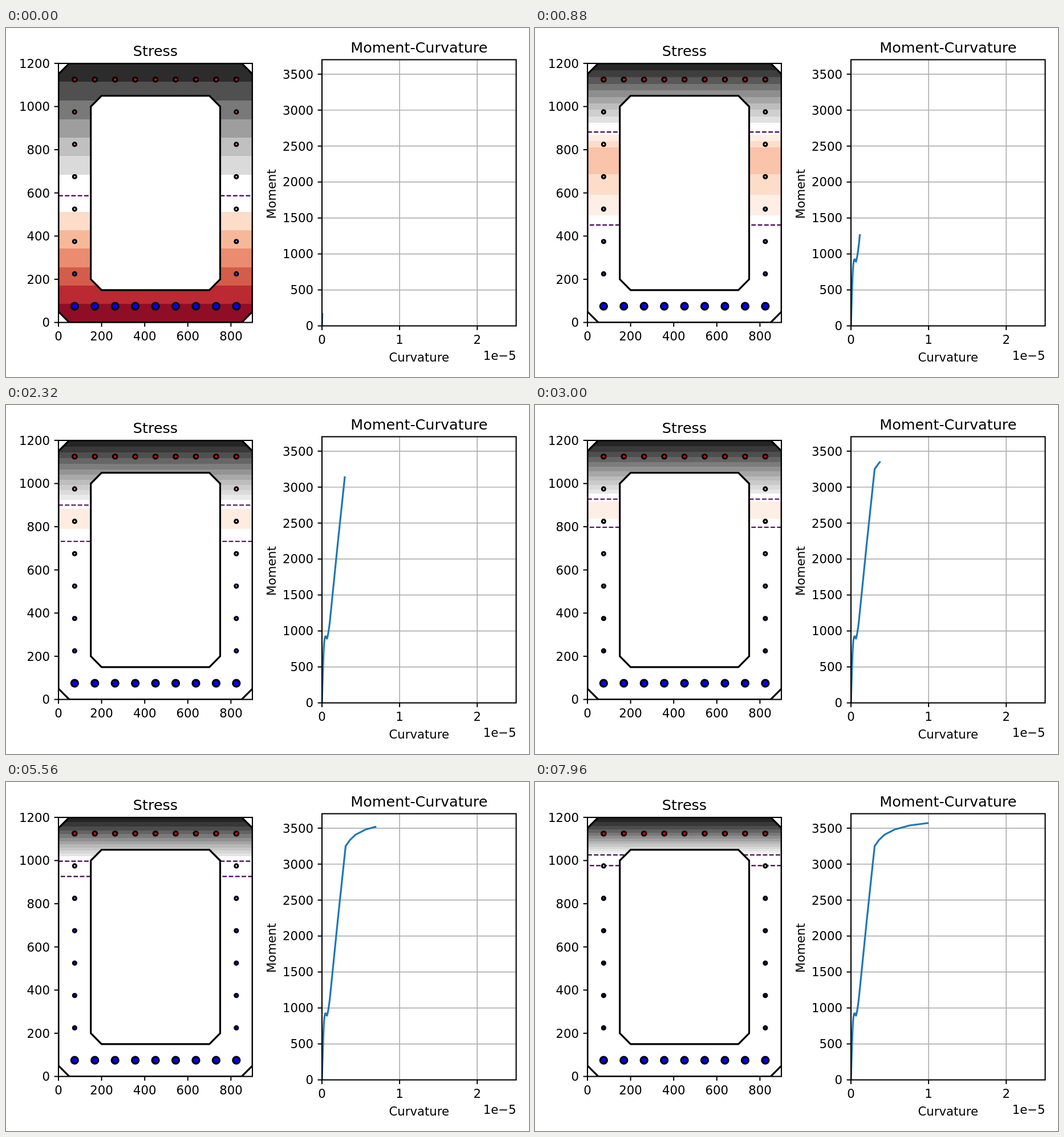
Animation of 917x611 px, one loop 8 s. Source, as an HTML page with a canvas:

```html
<!DOCTYPE html>
<html lang="en">
<head>
<meta charset="utf-8">
<title>Section stress and moment-curvature</title>
<style>
  html, body { margin: 0; width: 100%; height: 100%; overflow: hidden; background: #fff; }
  canvas { display: block; }
</style>
</head>
<body>
<canvas id="stage" width="917" height="611"></canvas>
<script>
const ctx = document.getElementById('stage').getContext('2d');

const STEP_MS = 40, STEPS = 200, CURV_STEP = 5e-8;
const PT = 917 / 432;               // pixels per typographic point
const LINE = 1.5 * PT, THIN = 0.8 * PT;
const FONT = '"DejaVu Sans", sans-serif';

// Left axes: section coordinates in mm
const U = 0.378;
const sx = u => 92 + u * U;
const sy = u => 515.5 - u * U;

// Right axes: curvature in 1e-5, moment
const px = c => 554 + c * 136.1;
const py = m => 521.5 - m * 0.12592;

// Material limits (strain)
const PEAK = 0.0022, SHAPE = 1.6, CRACK = 1.15e-4, OPEN = 4.95e-4, YIELD = 0.0025;

// Neutral axis height by step
const AXIS = [[0, 587], [3, 592], [5, 628], [7, 698], [9, 766], [11, 813], [15, 855], [20, 879],
  [30, 893], [40, 900], [60, 900], [67, 912], [75, 928], [86, 946], [100, 963], [118, 981],
  [139, 997], [165, 1012], [199, 1026]];

// Moment by curvature
const MOMENT = [[0, 0], [.005, 178], [.01, 355], [.015, 530], [.02, 680], [.025, 790], [.03, 858],
  [.035, 895], [.04, 915], [.045, 926], [.05, 924], [.055, 913], [.06, 897], [.065, 893],
  [.07, 912], [.08, 965], [.09, 1035], [.1, 1115], [.205, 2235], [.305, 3250], [.36, 3335],
  [.434, 3410], [.56, 3480], [.757, 3538], [1, 3572]];

const RAMP = ['67001f', 'b2182b', 'd6604d', 'f4a582', 'fddbc7', 'ffffff',
  'e0e0e0', 'bababa', '878787', '4d4d4d', '1a1a1a']
  .map(h => [0, 2, 4].map(i => parseInt(h.slice(i, i + 2), 16)));

const BARS = [];
for (let i = 0; i < 9; i++) {
  const x = 75 + i * 93.75;
  BARS.push([x, 75, 16], [x, 1125, 10]);
}
for (let y = 225; y <= 975; y += 150) BARS.push([75, y, 8], [825, y, 8]);

const rgb = c => `rgb(${c.map(Math.round).join(',')})`;
const mix = (a, b, t) => a.map((v, i) => v + (b[i] - v) * t);

function lerpTable(table, x) {
  let i = 1;
  while (i < table.length - 1 && table[i][0] < x) i++;
  const [x0, y0] = table[i - 1], [x1, y1] = table[i];
  return y0 + (y1 - y0) * (x - x0) / (x1 - x0);
}

// Concrete stress divided by initial stiffness, compression positive
function stress(e) {
  if (e >= 0) return PEAK / SHAPE * (1 - Math.pow(Math.max(0, 1 - e / PEAK), SHAPE));
  if (e > -CRACK) return e;
  return Math.min(0, -CRACK * (OPEN + e) / (OPEN - CRACK));
}

// s runs from -1 (tension) to 1 (compression); near zero reads as white
function rampColor(s) {
  if (s > -0.085 && s < 0.1) return '#fff';
  const p = (s + 1) * 5, i = Math.min(9, Math.floor(p));
  return rgb(mix(RAMP[i], RAMP[i + 1], p - i));
}

function chamfered(x0, y0, x1, y1) {
  const k = 50;
  [[x0 + k, y0], [x1 - k, y0], [x1, y0 + k], [x1, y1 - k],
   [x1 - k, y1], [x0 + k, y1], [x0, y1 - k], [x0, y0 + k]]
    .forEach(([x, y], i) => i ? ctx.lineTo(sx(x), sy(y)) : ctx.moveTo(sx(x), sy(y)));
  ctx.closePath();
}

function sectionPath() {
  ctx.beginPath();
  chamfered(0, 0, 900, 1200);
  chamfered(150, 150, 750, 1050);
}

function line(x0, y0, x1, y1) {
  ctx.beginPath();
  ctx.moveTo(x0, y0);
  ctx.lineTo(x1, y1);
  ctx.stroke();
}

function text(str, x, y, align, size = 10) {
  ctx.font = `${size * PT}px ${FONT}`;
  ctx.textAlign = align;
  ctx.fillText(str, x, y);
}

function pen(color, width) {
  ctx.strokeStyle = color;
  ctx.lineWidth = width;
}

function frame(x0, y0, x1, y1) {
  pen('#000', 2.1);
  ctx.strokeRect(x0, y0, x1 - x0, y1 - y0);
}

function xTick(x, y, label) {
  pen('#000', 2);
  line(x, y, x, y + 7.4);
  text(label, x, y + 31, 'center');
}

function yTick(x, y, label) {
  pen('#000', 2);
  line(x - 7.4, y, x, y);
  text(label, x - 14.9, y + 7.8, 'right');
}

function drawBands(curv, axis) {
  const strainAt = y => curv * (y - axis);
  const top = stress(strainAt(1200));
  const low = -Math.min(CRACK, -strainAt(0));
  const size = (top - low) / 14;
  const limit = Math.max(top, -low);
  for (let row = 61; row < 517; row++) {
    const y = Math.min(1200, Math.max(0, (515.5 - row - 0.5) / U));
    const band = Math.max(0, Math.min(13, Math.floor((stress(strainAt(y)) - low) / size)));
    ctx.fillStyle = rampColor((low + (band + 0.5) * size) / limit);
    ctx.fillRect(91, row, 343, 1);
  }
}

function drawZeroLines(curv, axis) {
  pen('#440154', PT);
  ctx.setLineDash([3.7 * PT, 1.6 * PT]);
  const end = axis - OPEN / curv;
  // The dash pattern restarts at each wall
  const walls = y => {
    const cut = Math.max(0, y - 1000);
    return [[0, 150 + cut], [750 - cut, 900]];
  };
  for (const [a, b] of walls(axis)) line(sx(a), sy(axis), sx(b), sy(axis));
  if (end > 0) for (const [a, b] of walls(end)) line(sx(b), sy(end), sx(a), sy(end));
  ctx.setLineDash([]);
}

function drawBars(curv, axis) {
  const maxTension = Math.min(YIELD, curv * (axis - 75));
  const maxPress = curv * (1125 - axis);
  pen('#000', LINE);
  for (const [x, y, r] of BARS) {
    const e = curv * (y - axis);
    const t = Math.min(1, e < 0 ? -e / maxTension : e / maxPress);
    ctx.fillStyle = rgb(mix([255, 255, 255], e < 0 ? [0, 0, 255] : [255, 0, 0], t));
    ctx.beginPath();
    ctx.arc(sx(x), sy(y), r * U, 0, 2 * Math.PI);
    ctx.fill();
    ctx.stroke();
  }
}

function drawSection(curv, axis) {
  ctx.save();
  sectionPath();
  ctx.clip('evenodd');
  drawBands(curv, axis);
  drawZeroLines(curv, axis);
  ctx.restore();

  ctx.save();
  ctx.beginPath();
  ctx.rect(sx(0), sy(1200), 900 * U, 1200 * U);
  ctx.clip();
  pen('#000', LINE);
  sectionPath();
  ctx.stroke();
  drawBars(curv, axis);
  ctx.restore();

  frame(92, 62, 432, 515.5);
  ctx.fillStyle = '#000';
  for (let v = 0; v <= 800; v += 200) xTick(sx(v), 515.5, v);
  for (let v = 0; v <= 1200; v += 200) yTick(92, sy(v), v);
  text('Stress', 262, 49.3, 'center', 12);
}

function drawCurve(c) {
  pen('#b0b0b0', THIN);
  for (let v = 1; v <= 2; v++) line(px(v), 55.5, px(v), 521.5);
  for (let v = 500; v <= 3500; v += 500) line(554, py(v), 894.5, py(v));

  ctx.save();
  ctx.beginPath();
  ctx.rect(554, 55.5, 340.5, 466);
  ctx.clip();
  pen('#1f77b4', LINE);
  ctx.lineJoin = 'round';
  ctx.beginPath();
  ctx.moveTo(px(0), py(0));
  for (const [x, m] of MOMENT) if (x < c) ctx.lineTo(px(x), py(m));
  ctx.lineTo(px(c), py(lerpTable(MOMENT, c)));
  ctx.stroke();
  ctx.restore();

  frame(554, 55.5, 894.5, 521.5);
  ctx.fillStyle = '#000';
  for (let v = 0; v <= 2; v++) xTick(px(v), 521.5, v);
  for (let v = 0; v <= 3500; v += 500) yTick(554, py(v), v);
  text('Moment-Curvature', 724.3, 42.7, 'center', 12);
  text('Curvature', 724.3, 583.5, 'center');
  text('1e\u22125', 894.5, 581, 'right');
  ctx.save();
  ctx.translate(473, 290.5);
  ctx.rotate(-Math.PI / 2);
  text('Moment', 0, 0, 'center');
  ctx.restore();
}

function draw(now) {
  const step = Math.floor(now / STEP_MS) % STEPS;
  const curv = (step + 1) * CURV_STEP;
  ctx.fillStyle = '#fff';
  ctx.fillRect(0, 0, 917, 611);
  drawSection(curv, lerpTable(AXIS, step));
  drawCurve(curv * 1e5);
}

const start = performance.now();
function tick() {
  draw(performance.now() - start);
  requestAnimationFrame(tick);
}
tick();
</script>
</body>
</html>
```
